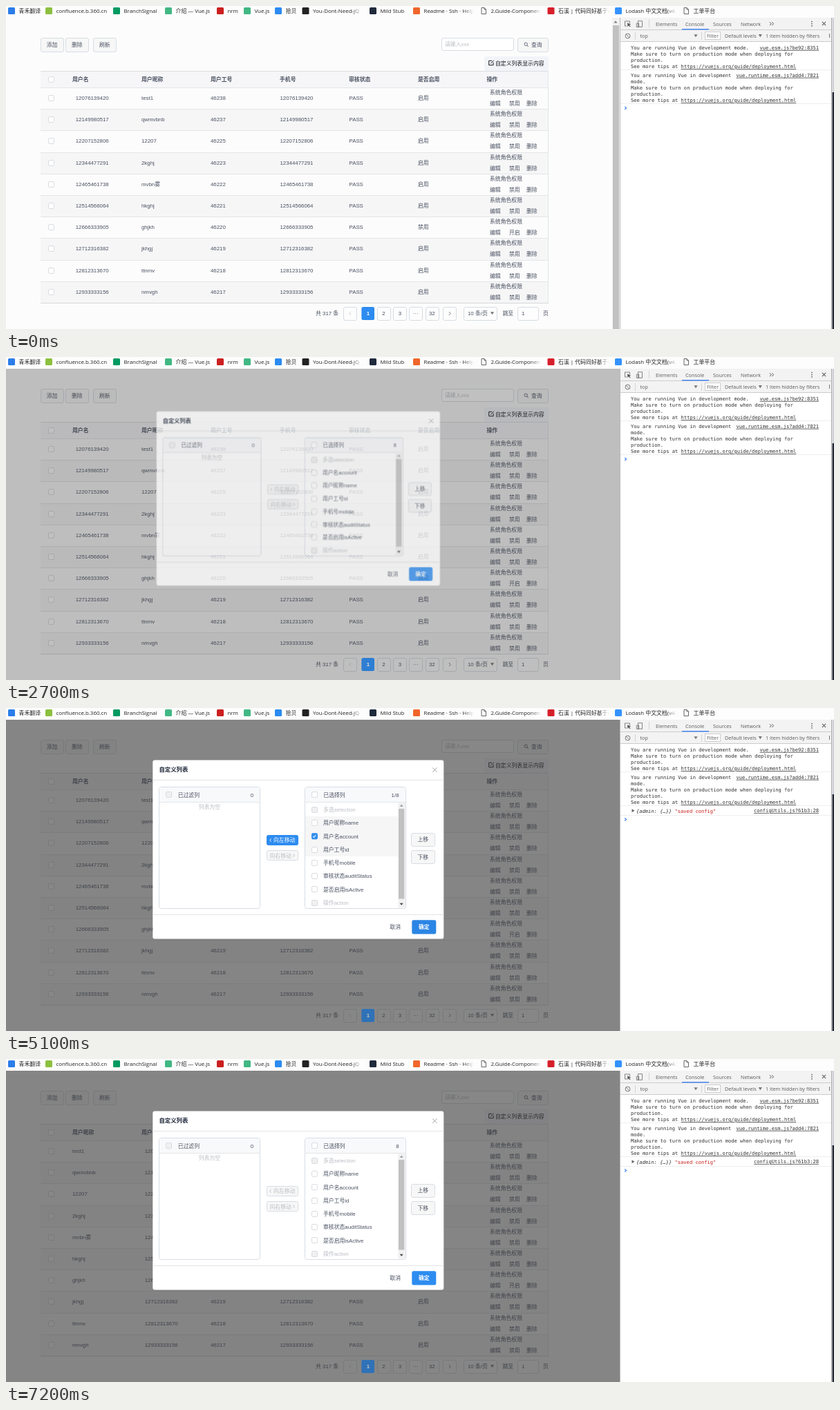
These frames come from a looping animation (1198 by 468 pixels, 8000 ms). An HTML page:

```html
<!DOCTYPE html>
<html>
<head>
<meta charset="utf-8">
<title>Column settings</title>
<style>
html, body { margin: 0; width: 100%; height: 100%; overflow: hidden; background: #fdfdfd; }
svg { display: block; }
text { font: 7.85px "Liberation Sans", "Noto Sans CJK SC", sans-serif; fill: #495060; white-space: pre; }
.b { font-weight: 700; }
.dark { fill: #16181f; }
.dim { fill: #bbbec4; }
.white { fill: #fff; }
.blue { fill: #57a3f3; }
.title { font-size: 8.4px; font-weight: 700; fill: #1c2438; }
.mark { font: 7.9px "Open Sans", "Noto Sans CJK SC", sans-serif; fill: #222; }
.tool { font: 7.3px "Open Sans", sans-serif; fill: #5a5a5a; }
.log { font: 7.1px "DejaVu Sans Mono", monospace; fill: #303030; }
.u { text-decoration: underline; }
.mid { text-anchor: middle; }
.end { text-anchor: end; }
.line { fill: none; stroke: #777; }

.anim { animation: 8s step-end infinite; }
.mask { animation-name: mask; }
.modal { animation-name: modal; transform-origin: 423px 205px; }
.scroll { animation-name: scroll; }
.shut { animation-name: shut; }
.find { animation-name: find; }
.old { animation-name: old; }
.new { animation-name: new; }
.quiet { animation-name: quiet; }
.saved { animation-name: saved; }
.hover { animation-name: hover; }
.checked { animation-name: checked; }
.unchecked { animation-name: unchecked; }
.down { animation-name: down; }
.up { animation-name: up; }
.shade { animation-name: shade; }
.lower { animation-name: lower; }
.ok { animation-name: ok; }

@keyframes mask {
  0% { opacity: 0 } 32.5% { opacity: .28 } 33.75% { opacity: .52 } 35% { opacity: .86 } 36.25% { opacity: 1 }
  65% { opacity: .5 } 66.25% { opacity: 0 }
  87.5% { opacity: .28 } 88.75% { opacity: .7 } 90%, 100% { opacity: 1 }
}
@keyframes modal {
  0% { opacity: 0; transform: scale(.9) }
  32.5% { opacity: .4; transform: scale(.94) }
  33.75% { opacity: .74; transform: scale(.974) }
  35% { opacity: .94; transform: scale(.994) }
  36.25% { opacity: 1; transform: none }
  65% { opacity: .5; transform: scale(.95) }
  66.25% { opacity: 0; transform: scale(.9) }
  87.5% { opacity: .4; transform: scale(.94) }
  88.75% { opacity: .82; transform: scale(.982) }
  90%, 100% { opacity: 1; transform: none }
}
@keyframes scroll { 0% { opacity: 1 } 32.5% { opacity: 0 } 66.25% { opacity: 1 } 87.5%, 100% { opacity: 0 } }
@keyframes shut { 0% { stroke: #666 } 5% { stroke: #111 } 6.25%, 100% { stroke: #666 } }
@keyframes find { 0% { opacity: 0 } 23.75% { opacity: .45 } 25% { opacity: .25 } 26.25%, 100% { opacity: 0 } }
@keyframes old { 0% { opacity: 1 } 65%, 100% { opacity: 0 } }
@keyframes new { 0% { opacity: 0 } 65%, 100% { opacity: 1 } }
@keyframes quiet { 0% { opacity: 1 } 63.75%, 100% { opacity: 0 } }
@keyframes saved { 0% { opacity: 0 } 63.75%, 100% { opacity: 1 } }
@keyframes hover {
  0% { opacity: 0; transform: none }
  66.25% { opacity: 1; transform: translateY(187px) }
  71.25% { opacity: 1; transform: translateY(94px) }
  72.5% { opacity: 1; transform: translateY(31px) }
  73.75%, 100% { opacity: 0; transform: none }
}
@keyframes checked { 0% { opacity: 0 } 46.25% { opacity: 1 } 66.25%, 100% { opacity: 0 } }
@keyframes unchecked { 0% { opacity: 1 } 46.25% { opacity: 0 } 66.25%, 100% { opacity: 1 } }
@keyframes down { 0% { transform: none } 55%, 100% { transform: translateY(19.25px) } }
@keyframes up { 0% { transform: none } 55%, 100% { transform: translateY(-19.25px) } }
@keyframes shade { 0% { opacity: 0 } 55% { opacity: 1 } 66.25%, 100% { opacity: 0 } }
@keyframes lower { 0% { opacity: 0 } 52.5% { opacity: 1 } 57.5%, 100% { opacity: 0 } }
@keyframes ok { 0% { fill: #2d8cf0 } 58.75% { fill: #2b85e4 } 66.25%, 100% { fill: #2d8cf0 } }
</style>
</head>
<body>
<svg id="stage" width="1198" height="468" viewBox="0 0 1198 468"></svg>
<script>
const BLUE = '#2d8cf0', EDGE = '#d7dde4', RULE = '#e3e5e8';

// Text is placed by its vertical centre.
const text = (x, y, s, cls = '') => `<text x="${x}" y="${y + 2.9}" class="${cls}">${s}</text>`;
const rect = (x, y, w, h, fill, r = 0, cls = '') =>
  `<rect x="${x}" y="${y}" width="${w}" height="${h}" rx="${r}" fill="${fill}" class="${cls}"/>`;
// Outlined boxes sit on the pixel grid so that their edges stay sharp.
const snap = v => Math.floor(v) + .5;
const frame = (x, y, w, h, fill, stroke = EDGE, r = 2.5) =>
  `<rect x="${snap(x)}" y="${snap(y)}" width="${Math.round(w)}" height="${Math.round(h)}" rx="${r}" fill="${fill}" stroke="${stroke}"/>`;
const path = (d, stroke = '#777', w = .9, cls = '') =>
  `<path d="${d}" fill="none" stroke="${stroke}" stroke-width="${w}" class="${cls}"/>`;
const fill = (d, color) => `<path d="${d}" fill="${color}"/>`;
const hline = (x1, x2, y, color = RULE) => path(`M${x1} ${snap(y)}H${x2}`, color, 1);
const group = (cls, ...parts) => `<g class="${cls}">${parts.join('')}</g>`;
const anim = (name, ...parts) => group('anim ' + name, ...parts);
const box = (x, y, off) => frame(x - 4, y - 4, 8, 8, off ? '#f0f0f1' : '#fff', '#dadce0', 1.5);
const button = (x, y, w, h, label, bg = '#f7f7f7') =>
  frame(x, y, w, h, bg) + text(x + w / 2, y + h / 2, label, 'mid');
const caret = (x, y, c = '#777', r = 2.6) => fill(`M${x - r} ${y - r * .7}h${2 * r}l${-r} ${r * 1.6}z`, c);
const cross = (x, y, r, c, w, cls) =>
  path(`M${x - r} ${y - r}l${2 * r} ${2 * r}m0 ${-2 * r}l${-2 * r} ${2 * r}`, c, w, cls);

function bookmarks() {
  // icon x, icon colour (none = blank page), label, faded end
  const items = [
    [8, '#2b7de9', '青禾翻译'], [62, '#8cc03f', 'confluence.b.360.cn'], [160, '#009a61', 'BranchSignal'],
    [235, '#41b883', '介绍 — Vue.js'], [310, '#cb1f1f', 'nrm'], [349, '#41b883', 'Vue.js'],
    [394, '#2b8bf2', '拾贝'], [433.5, '#222', 'You-Dont-Need-jQ', 516], [531, '#1f2a3c', 'Mild Stub'],
    [594, '#f0662b', 'Readme · Ssh · Help', 677], [691, '', '2.Guide-Componen', 775],
    [788.5, '#d5202b', '石溪 | 代码同好基于G', 873], [886, '#3492ff', 'Lodash 中文文档(v4.', 971], [984, '', '工单平台']
  ];
  return rect(0, 0, 1198, 17, '#fdfdfd') + items.map(([x, color, label, end]) => {
    const icon = color ? rect(x - 5, 2, 10, 10, color, 1.5)
      : path(`M${x - 3} 2.5h4l2.5 2.5v6.5h-6.5zM${x + 1} 2.5v2.5h2.5`, '#555', .9);
    return icon + text(x + 10.5, 7.5, label, 'mark') +
      (end ? rect(end - 16, 0, 16, 16, 'url(#fade)') + rect(end, 0, 10, 16, '#fdfdfd') : '');
  }).join('');
}

const people = [
  ['12076139420', 'test1', 46238], ['12149980517', 'qwmvbnb', 46237], ['12207152806', '12207', 46225],
  ['12344477291', '2kghj', 46223], ['12465461738', 'mvbn雾', 46222], ['12514566064', 'hkghj', 46221],
  ['12666333905', 'ghjkh', 46220], ['12712316382', 'jkhgj', 46219], ['12812313670', 'ttnmv', 46218],
  ['12933333156', 'nmvgh', 46217]
];
const rowY = i => Math.round(118 + 31.2 * i);

function table() {
  const stripes = people.map((p, i) =>
    rect(50, rowY(i), 735, 32, i % 2 ? '#f6f6f7' : '#fcfcfc') + hline(50, 785, rowY(i))).join('');
  const heads = ['用户工号', '手机号', '审核状态', '是否启用'].map((s, i) => text(296 + 100 * i, 106, s, 'b')).join('');
  const cells = people.map(([phone, , id], i) => {
    const y = rowY(i) + 15, off = i === 6;
    return box(65.5, y) + text(296, y, id) + text(396.5, y, phone) + text(496.5, y, 'PASS') +
      text(596, y, off ? '禁用' : '启用') + text(700, y - 7.7, '系统角色权限') + text(700, y + 8, '编辑') +
      text(728, y + 8, off ? '开启' : '禁用') + text(753, y + 8, '删除');
  }).join('');
  const pair = (phoneX, nameX) => text(phoneX, 106, '用户名', 'b') + text(nameX, 106, '用户昵称', 'b') +
    people.map(([phone, name], i) => text(phoneX + 4.7, rowY(i) + 15, phone) + text(nameX, rowY(i) + 15, name)).join('');
  return rect(50, 94, 735, 24, '#f6f6f8') + stripes +
    rect(50, 119, 735, 30, '#ebf7ff', 0, 'anim hover') +
    hline(50, 785, 94, '#dddee1') + hline(50, 785, 430, '#d5d7da') + path('M784.5 94V430', RULE, 1) +
    box(65.5, 106) + heads + text(695.5, 106, '操作', 'b') + cells +
    anim('old', pair(96, 196)) + anim('new', pair(196, 96));
}

const glass = c => `<circle cx="752.2" cy="55.3" r="2.2" fill="none" stroke="${c}" stroke-width=".8"/>` + path('M753.8 57l2 2', c, .9);

const pageOne = () => rect(514.5, 436, 18.5, 19, BLUE, 2.5) + text(524, 445.3, '1', 'mid white b');

function page() {
  const pager = [[537, '2'], [560.5, '3'], [583.5, '···'], [607, '32']]
    .map(([x, s]) => button(x, 436, 18.7, 18.5, s, '#fdfdfd')).join('');
  return rect(0, 17, 888, 451, '#fcfcfc') +
    button(50, 46.3, 33, 19.5, '添加') + button(86.3, 46.3, 33, 19.5, '删除') + button(126.3, 46.3, 33, 19.5, '刷新') +
    frame(630.4, 46.4, 104, 18.2, '#fff') + text(635, 55.3, '请输入xxx', 'dim') +
    frame(740.5, 46.3, 44, 19.5, '#f7f7f7') + glass('#495060') + text(760, 56, '查询') +
    anim('find', frame(740.5, 46.3, 44, 19.5, 'none', '#57a3f3'), glass('#57a3f3'), text(760, 56, '查询', 'blue')) +
    rect(692, 73, 93, 21, '#f3f4f9', 2.5) +
    path('M703 79.3h-4.3v6.4h6.4v-4M701.2 83.5l4.6-4.8', '#16181f', 1) + text(708, 83, '自定义列表显示内容', 'dark') +
    table() +
    text(448, 445.3, '共 317 条') + pageOne() +
    button(488.7, 436, 18.7, 18.5, '', '#fdfdfd') + path('M499 443l-2.2 2.5 2.2 2.5', '#c5c8ce', .8) + pager +
    button(632.7, 436, 18.7, 18.5, '', '#fdfdfd') + path('M641 443l2.2 2.5-2.2 2.5', '#666', .8) +
    frame(662.5, 436, 48, 18.5, '#fdfdfd') + text(668, 445.3, '10 条/页') + caret(703.5, 445) +
    text(718.5, 445.3, '跳至') + frame(740.8, 436, 29.5, 18.5, '#fdfdfd') + text(746, 445.3, '1') + text(777, 445.3, '页') +
    anim('scroll', rect(877, 17, 11, 451, '#f1f1f1'), fill('M879.5 24.5h5l-2.5-3z', '#777'), rect(878, 28, 9, 440, '#c1c1c1'));
}

function devtools() {
  const tabs = [[940, 'Elements'], [983, 'Console'], [1023, 'Sources'], [1063, 'Network']];
  const logs = (y, lines) => lines.map((s, i) => text(904, y + 9.1 * i, s, 'log')).join('');
  const tail = ['Make sure to turn on production mode when deploying for', 'production.',
    'See more tips at <tspan class="u">https://vuejs.org/guide/deployment.html</tspan>'];
  const link = (y, s) => text(1176, y, s, 'log u end');
  const prompt = y => path(`M895.3 ${y - 2}l2.2 2-2.2 2`, '#367cf1', 1.1);
  return rect(888, 17, 310, 451, '#fff') + rect(889, 17, 305, 34, '#f3f3f3') +
    hline(889, 1194, 34, '#ccc') + hline(889, 1194, 51, '#ccc') + path('M888.5 17V468', '#bbb', 1) +
    path('M902.5 25v-3h-7v7h3') + fill('M899 24.5l5.2 2-2.2 1 1.6 2-1 .8-1.6-2-1.4 1.7z', '#555') +
    path('M914.5 21.7h6v8.6h-6zM912.3 25.2h3.4v5.2h-3.4z') +
    path('M930.5 20v11M910.5 38v11M1006.5 38v11', '#ccc', .8) +
    tabs.map(([x, s]) => text(x, 25.8, s, 'tool' + (x === 983 ? ' dark' : ''))).join('') +
    rect(978, 33, 39, 1.5, '#4a8af4') +
    path('M1105 23.3l2.2 2.4-2.2 2.4M1108.3 23.3l2.2 2.4-2.2 2.4', '#555', 1) +
    [22.6, 25.7, 28.8].map(y => rect(1165.2, y - .7, 1.5, 1.5, '#555')).join('') +
    cross(1183.5, 25.5, 2.6, '#666', 1.2, 'anim shut') +
    '<circle cx="899.5" cy="43.5" r="3.4" class="line"/>' + path('M897.2 41.2l4.6 4.6') +
    text(917.5, 43.3, 'top', 'tool') + caret(998, 43) +
    frame(1011.4, 37.3, 22, 11, '#fff', '#ccc', 0) + text(1014, 43.3, 'Filter', 'tool') +
    text(1040, 43.3, 'Default levels', 'tool') + caret(1091.3, 42.8) +
    text(1099, 43.3, '1 item hidden by filters', 'tool dim') + path('M1191.5 40v6', '#777', 1) +
    logs(60, ['You are running Vue in development mode.', ...tail]) + link(60, 'vue.esm.js?be92:8351') + hline(889, 1194, 92, '#eee') +
    logs(99.9, ['You are running Vue in development', 'mode.', ...tail]) + link(99.9, 'vue.runtime.esm.js?add4:7821') + hline(889, 1194, 141, '#eee') +
    anim('quiet', prompt(148)) +
    anim('saved', fill('M905.5 146.2v5l4-2.5z', '#666'),
      text(912, 149, '<tspan font-style="italic">{admin: {…}}</tspan> <tspan fill="#c41a16">"saved config"</tspan>', 'log'),
      link(148.5, 'configUtils.js?61b3:28'), hline(889, 1194, 155, '#eee'), prompt(161.5)) +
    path('M1194.5 17V468', '#aaa', 1) + rect(1195.5, 17, 2.5, 108, '#d0d0d6') + rect(1195.5, 125, 2.5, 343, '#262a36');
}

function modal() {
  const panel = (x, title, off) => frame(x, 114, 146, 175.5, '#fff', EDGE, 3) +
    rect(x + .8, 115, 144.4, 21, '#f8f9fb', 2.5) + hline(x, x + 146, 136) +
    box(x + 14, 125.8, off) + text(x + 27, 125.8, title);
  const rowAt = i => 147.3 + 19.25 * i;
  const item = (s, i) => {
    const off = i === 0 || i === 7;
    return box(446, rowAt(i), off) + text(459, rowAt(i), s, off ? 'dim' : '');
  };
  const names = ['多选selection', '用户名account', '用户昵称name', '用户工号id', '手机号mobile', '审核状态auditStatus', '是否启用isActive', '操作action'];
  const items = names.map((s, i) => {
    if (i === 1) return anim('down', item(s, i), anim('checked',
      frame(442, rowAt(1) - 4, 8, 8, BLUE, BLUE, 1.5), path(`M444 ${rowAt(1)}l1.6 1.6 2.8-3.4`, '#fff', 1.1)));
    return i === 2 ? anim('up', item(s, i)) : item(s, i);
  }).join('');
  const left = (cls, bg, edge, mark) => frame(377, 184, 45, 14, bg, edge, 2) +
    path('M383.6 189.3l-1.8 2.2 1.8 2.2', mark, .9) + text(387, 191.4, '向左移动', cls);
  return rect(212.3, 75.5, 421, 259, '#fff', 3) + text(221.5, 89.5, '自定义列表', 'title') +
    cross(620.3, 89.6, 3.2, '#999', .9) + hline(212.3, 633.3, 104) + hline(212.3, 633.3, 299) +
    panel(221.7, '已过滤列', true) + text(358, 125.8, '0', 'end') + text(294.5, 143.5, '列表为空', 'mid dim') +
    panel(432.3, '已选择列') +
    anim('unchecked', text(568.5, 125.8, '8', 'end')) + anim('checked', text(568.5, 125.8, '1/8', 'end')) +
    anim('shade', rect(433, 157, 134, 58, '#f6f6f7')) + items +
    rect(567.3, 137.3, 10.3, 152, '#f1f1f1') + rect(568, 146, 8.3, 130.5, '#c1c1c1') +
    fill('M569.7 142.7h5l-2.5-3z', '#999') + fill('M569.7 282.8h5l-2.5 3z', '#444') +
    anim('unchecked', left('dim', '#f7f7f7', EDGE, '#bbb')) + anim('checked', left('white', BLUE, BLUE, '#fff')) +
    frame(377, 206.3, 45, 14, '#f7f7f7', EDGE, 2) + text(381.5, 213.6, '向右移动', 'dim') + path('M415.6 211.4l1.8 2.2-1.8 2.2', '#bbb', .9) +
    button(586.5, 181, 33.7, 19, '上移') + button(586.5, 206.5, 33.7, 19, '下移') +
    anim('lower', frame(586.5, 206.5, 33.7, 19, 'none', '#57a3f3')) +
    text(555.3, 317.2, '取消') + rect(587.3, 307.3, 35, 20.3, BLUE, 2.5, 'anim ok') + text(604.8, 317.3, '确定', 'mid white b');
}

document.getElementById('stage').innerHTML =
  '<defs><linearGradient id="fade"><stop stop-color="#fdfdfd" stop-opacity="0"/><stop offset="1" stop-color="#fdfdfd"/></linearGradient></defs>' +
  bookmarks() + page() +
  anim('mask', rect(0, 17, 888, 451, 'rgba(55,55,55,.6)')) +
  `<g opacity=".5">${pageOne()}</g>` +
  devtools() + anim('modal', modal());
</script>
</body>
</html>
```
